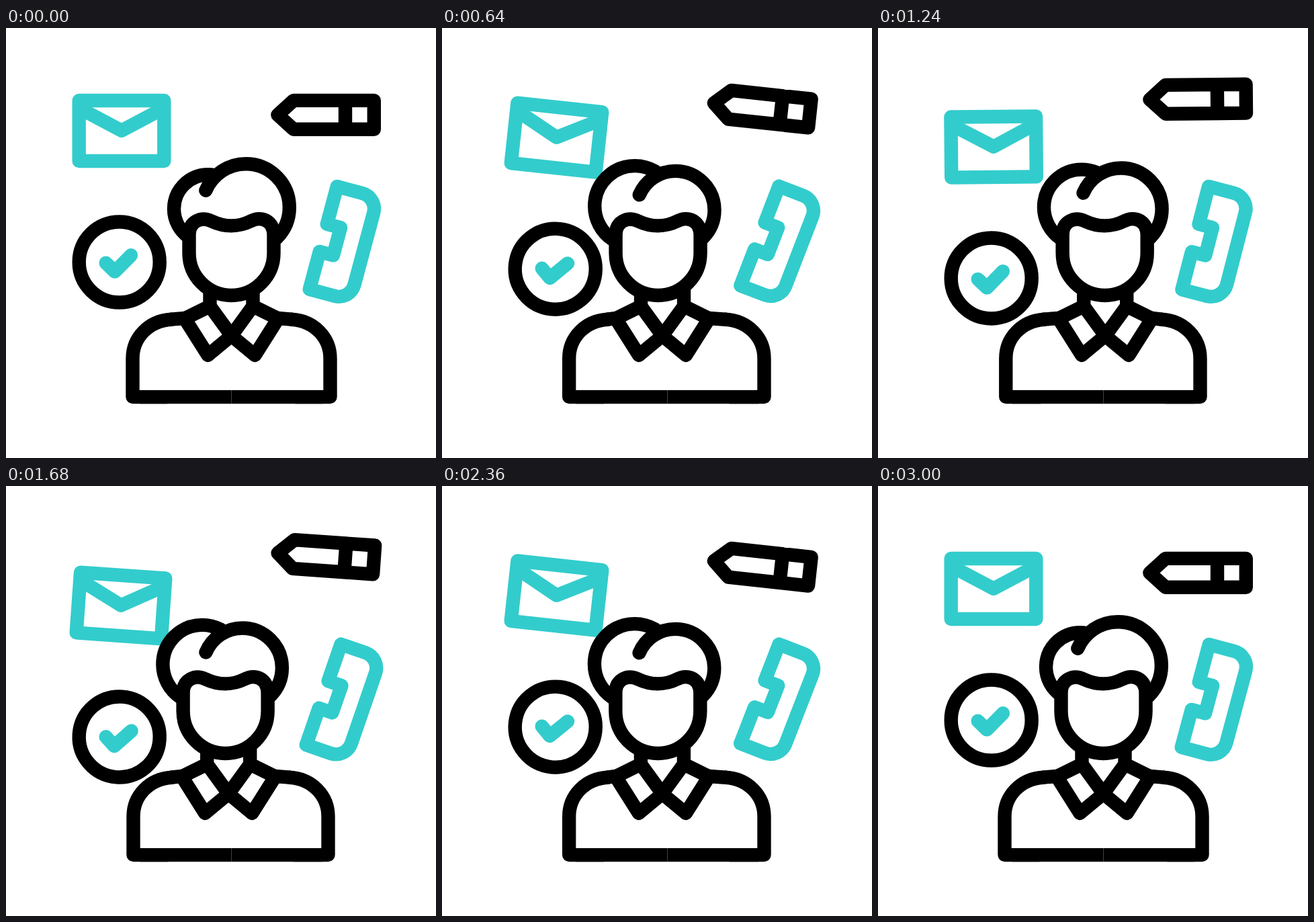
An HTML page for the animation above (3.02 s loop, 640 px wide and 640 px high).

```html
<!DOCTYPE html>
<html lang="en">
<head>
<meta charset="utf-8">
<title>Assistant</title>
<style>
  html, body { margin: 0; width: 100%; height: 100%; overflow: hidden; background: #fff; }
  svg { display: block; width: 100%; height: 100%; }
  svg * { animation: 3020ms cubic-bezier(.3333, 0, .6667, 1) infinite; }
  .ink, .teal { fill: none; stroke-width: 20.4; stroke-linecap: round; stroke-linejoin: round; }
  .ink { stroke: #000; }
  .teal { stroke: #3cc; }

  .prop { animation-name: bob, swing; }
  .mail   { --bob: 26px; transform-origin: 171.8px 139px; }
  .badge  { --bob: 26px; transform-origin: 168.7px 348.5px; }
  .pencil { --bob: -25.5px; transform-origin: 476px 129.3px; }
  .phone  { --bob: 0px; transform-origin: 500px 317px; }

  .sway { animation-name: sway; }
  .head   { --odd: -23.3px; --even: 25px; }
  .collar { --odd: -13.4px; --even: 17.2px; }
  .left   { --odd: 0px; --even: 3.4px; }
  .right  { --odd: -3px; --even: -3px; }

  .yoke-left  { animation-name: yoke-left; }
  .yoke-right { animation-name: yoke-right; }

  /* Hair arcs: dash lengths are degrees (pathLength 360). */
  .hair { animation-name: puff; stroke-dasharray: var(--arc); }
  .lobe  { --x: 301px; --y: 264px; --r: 62px; --arc: 157 203; --puffed: 181 179; stroke-dashoffset: -124; }
  .quiff { --x: 362.3px; --y: 272px; --r: 56.6px; --arc: 202 158; --puffed: 202 158; stroke-dashoffset: -203; }

  /* Beats fall every 500 ms; the rest pose holds for the last 20 ms. */
  @keyframes bob {
    0%, 99.338%, 100% { translate: 0 0; }
    49.669% { translate: 0 var(--bob); }
  }
  @keyframes swing {
    0%, 99.338%, 100% { rotate: 0deg; }
    16.556%, 49.669%, 82.781% { rotate: 10deg; }
    33.113%, 66.225% { rotate: -10deg; }
  }
  @keyframes sway {
    0%, 99.338%, 100% { translate: 0 0; }
    16.556%, 49.669%, 82.781% { translate: var(--odd) 0; }
    33.113%, 66.225% { translate: var(--even) 0; }
  }
  @keyframes puff {
    16.556%, 49.669%, 82.781% { cx: var(--x); cy: var(--y); r: var(--r); stroke-dasharray: var(--puffed); }
    0%, 33.113%, 66.225%, 99.338%, 100% { stroke-dasharray: var(--arc); }
  }
  @keyframes yoke-left {
    0%, 99.338%, 100% { d: path("M246 433.7 L266 432"); }
    16.556%, 49.669%, 82.781% { d: path("M246 433.7 L252.6 432"); }
    33.113%, 66.225% { d: path("M246 433.7 L283.2 432"); }
  }
  @keyframes yoke-right {
    0%, 99.338%, 100% { d: path("M425 433.7 L405 432"); }
    16.556%, 49.669%, 82.781% { d: path("M422 433.7 L391.6 432"); }
    33.113%, 66.225% { d: path("M422 433.7 L422.2 432"); }
  }
  /* Resting hair shape, restored on every even beat. */
  .lobe  { cx: 301px; cy: 269.3px; r: 51px; }
  .quiff { cx: 357px; cy: 267px; r: 64.8px; }
  .lobe  { animation-name: puff, rest-lobe; }
  .quiff { animation-name: puff, rest-quiff; }
  @keyframes rest-lobe {
    0%, 33.113%, 66.225%, 99.338%, 100% { cx: 301px; cy: 269.3px; r: 51px; }
    16.556%, 49.669%, 82.781% { cx: var(--x); cy: var(--y); r: var(--r); }
  }
  @keyframes rest-quiff {
    0%, 33.113%, 66.225%, 99.338%, 100% { cx: 357px; cy: 267px; r: 64.8px; }
    16.556%, 49.669%, 82.781% { cx: var(--x); cy: var(--y); r: var(--r); }
  }
</style>
</head>
<body>
<svg viewBox="0 0 640 640">
  <g class="prop mail teal">
    <rect x="108.7" y="108" width="126.6" height="90"/>
    <path d="M113 121.5 L172 152.7 L231 121.5"/>
  </g>

  <g class="prop pencil ink">
    <path d="M404.4 129.3 L428 107.9 H547.8 V150.8 H428 Z M505 107.9 V150.8"/>
  </g>

  <g class="prop phone teal">
    <path transform="translate(500 317) rotate(15)"
      d="M-28 -76.5 H10.7 a24 24 0 0 1 24 24 V58 a24 24 0 0 1 -24 24 H-28 V24 H-7 V-18.6 H-28 Z"/>
  </g>

  <g class="prop badge">
    <circle class="ink" cx="168.7" cy="348.5" r="60"/>
    <path class="teal" d="M148.7 349.7 L162 362.6 L186 338.3"/>
  </g>

  <g class="ink">
    <g class="sway left">
      <path id="side" d="M246 433.7 C212 435.8 188.5 461 188.5 492 V549.1 H240"/>
    </g>
    <g class="sway right"><use href="#side" transform="matrix(-1 0 0 1 671 0)"/></g>
    <path d="M200 549.1 H471"/>
    <path class="yoke-left" d="M246 433.7 L266 432"/>
    <path class="yoke-right" d="M425 433.7 L405 432"/>
  </g>
  <rect x="335" y="538.9" width="1" height="20.4" fill="#fff" opacity=".25"/>

  <g class="sway collar ink">
    <path id="flap" d="M303.5 380 V414 L266 432.5 L300.5 487 L335.5 458 L303.5 414"/>
    <use href="#flap" transform="matrix(-1 0 0 1 671 0)"/>
  </g>

  <g class="sway head ink">
    <circle class="hair lobe" pathLength="360"/>
    <circle class="hair quiff" pathLength="360"/>
    <path fill="#fff" d="M272.5 308 C272.5 288 290 280 306 287.5 C325 296.5 346 296.5 364 287.5 C381 278.5 398.5 288 398.5 308 V335 A63 63 0 0 1 272.5 335 Z"/>
  </g>
</svg>
</body>
</html>
```
